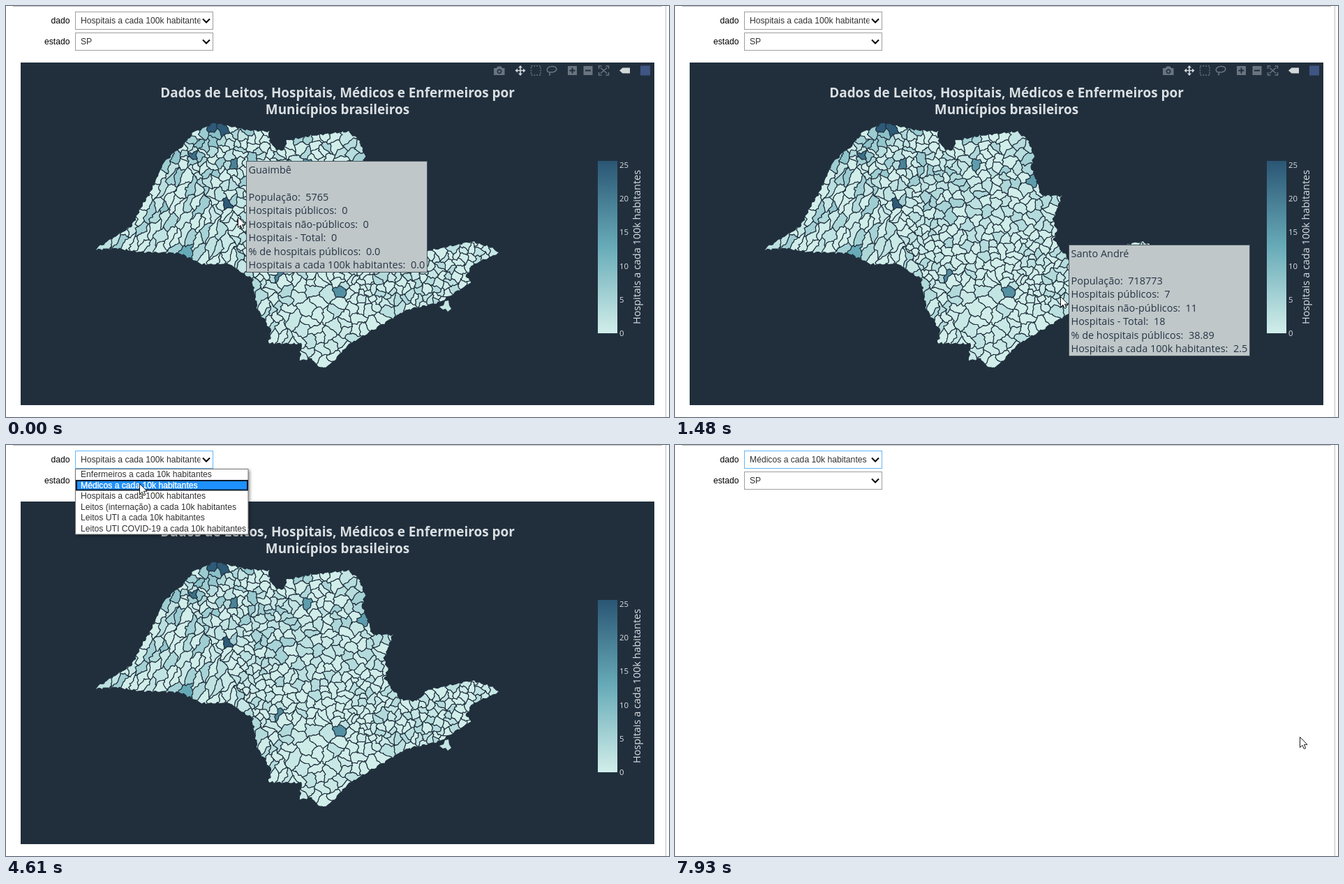
An HTML page that plays this animation: 950x589 px, repeating every 8000 ms.

```html
<!DOCTYPE html>
<html lang="pt-BR">
<head>
<meta charset="utf-8">
<title>Dados por municípios</title>
<style>
  html, body { margin: 0; width: 100%; height: 100%; overflow: hidden; background: #fff; }
  svg { display: block; }
  text { white-space: pre; }
  .ui { font: 12.17px "Liberation Sans", Arial, sans-serif; fill: #333; }
  .label { fill: #000; text-anchor: end; }
  .plot { font-family: "Open Sans", "Noto Sans", sans-serif; fill: #dadfe2; }
  .title { font-size: 18.9px; font-weight: 700; text-anchor: middle; }
  .tick { font-size: 11.4px; }
  .axis { font-size: 14.45px; text-anchor: middle; }
  #tip text { font: 14.45px "Open Sans", "Noto Sans", sans-serif; fill: #263544; }
  .box { fill: #fff; stroke: #9e9e9e; }
  .chev { fill: none; stroke: #000; stroke-width: 2; }
  #list { filter: drop-shadow(2px 2px 2px rgba(0, 0, 0, .4)); }
  #list .on { fill: #fff; stroke: #fff; stroke-width: .35; }
  #cells path { stroke: #212f3d; stroke-width: 1.15; stroke-linejoin: round; }
  .line { fill: none; stroke: #69747f; stroke-width: 1.5; }
  .active { fill: #d3d8db; }
</style>
</head>
<body>
<svg id="stage" width="950" height="589" viewBox="0 0 950 589">
  <defs>
    <linearGradient id="ramp" x1="0" y1="1" x2="0" y2="0"></linearGradient>
    <clipPath id="land"><path id="coast"/></clipPath>
    <clipPath id="field"><rect x="100" y="9" width="178.500" height="24"/></clipPath>
  </defs>
  <path d="M10 .5H940M945.500 0V589" stroke="#bdbdbd" fill="none"/>

  <g id="plot" class="plot">
    <rect x="21" y="81" width="908" height="491" fill="#212f3d"/>
    <text class="title" x="475" y="131">Dados de Leitos, Hospitais, Médicos e Enfermeiros por</text>
    <text class="title" x="475" y="155">Municípios brasileiros</text>
    <g id="cells" clip-path="url(#land)"></g>
    <path d="M621 431l6-2 2-6 5-1 1 7 3 5-5 4-3-4-4 1z" fill="#c4e7e4"/>
    <rect x="848" y="222" width="28" height="247" fill="url(#ramp)"/>
    <g id="ticks"></g>
    <text class="axis" transform="translate(908.500 345.500) rotate(-90)">Hospitais a cada 100k habitantes</text>

    <g id="bar" fill="#69747f">
      <path fill-rule="evenodd" d="M699 89h4l1.500-2.500h5L711 89h3.500v10H699zM707 90.300a3.500 3.500 0 1 0 .01 0zM707 92a1.800 1.800 0 1 1-.01 0z"/>
      <path class="active" d="M737 85l3 3.500h-2.200v3.200h3.200V89.500l3.500 3-3.500 3v-2.200h-3.200v3.200h2.200l-3 3.500-3-3.500h2.200v-3.200H733v2.200l-3.500-3 3.500-3v2.200h3.200V88.500H734z"/>
      <rect class="line" x="752.500" y="86" width="13.500" height="13" stroke-dasharray="2 1.800"/>
      <path class="line" d="M778 95c-5-2-3-8 4-8.500s9 5 4 7.500-8-1-7 2 1 2-1 3"/>
      <path fill-rule="evenodd" d="M805 86h13v13h-13zM810.500 88.500v3h-3v2h3v3h2v-3h3v-2h-3v-3z"/>
      <path fill-rule="evenodd" d="M827.500 86h13v13h-13zM830 91.500v2h8v-2z"/>
      <path class="line" d="M849.500 90v-4h4M859.500 86h4v4M863.500 95v4h-4M853.500 99h-4v-4M852 88.500l9 8M861 88.500l-9 8"/>
      <path class="active" d="M879 92.500l4.500-4H894v8h-10.500z"/>
      <rect x="909" y="85.500" width="14" height="14" fill="#3f5583"/>
    </g>
  </g>

  <g id="tip"><rect height="159" fill="#bfc7c9" stroke="#49545d"/></g>

  <g class="ui">
    <text class="label" x="91.500" y="25">dado</text>
    <text class="label" x="91.500" y="55">estado</text>
    <rect id="focus" class="box" x="99.500" y="8.500" width="197" height="25"/>
    <rect class="box" x="99.500" y="38.500" width="197" height="25"/>
    <text id="choice" x="107" y="25" clip-path="url(#field)"></text>
    <text x="107" y="55">SP</text>
    <path class="chev" d="M282 18.500l5 5 5-5M282 48.500l5 5 5-5"/>
    <g id="list"><rect x="99.500" y="34.500" width="247.500" height="93.500" fill="#fff" stroke="#767676"/></g>
  </g>

  <path id="cursor" d="M.5.500V15.500L4 12.300 6.300 17.500 8.700 16.500 6.500 11.300H11z" fill="#fff" stroke="#000" stroke-width=".9"/>
</svg>

<script>
const LOOP = 8000;
const $ = id => document.getElementById(id);
const clamp = v => Math.max(0, Math.min(1, v));
const mix = (a, b, u) => a.map((v, i) => v + (b[i] - v) * u);
function add(parent, tag, attrs, text) {
  const el = document.createElementNS('http://www.w3.org/2000/svg', tag);
  for (const k in attrs) el.setAttribute(k, attrs[k]);
  if (text) el.textContent = text;
  return parent.appendChild(el);
}

// Colour scale from 0 to 25.6
const pale = [209, 238, 234], mid = [104, 171, 184], deep = [42, 86, 116];
function shade(v) {
  const u = clamp(v / 25.6) * 2;
  return `rgb(${(u < 1 ? mix(pale, mid, u) : mix(mid, deep, u - 1)).map(Math.round)})`;
}
for (const u of [0, .5, 1]) add($('ramp'), 'stop', { offset: u, 'stop-color': shade(u * 25.6) });
for (let v = 0; v <= 25; v += 5)
  add($('ticks'), 'text', { class: 'tick', x: 879, y: 473 - v * 9.65 }, String(v));

// Map: a Voronoi mesh clipped to the state border
const border = ('127,349 179,316 206,268 228,222 255,199 268,182 299,168 345,178 376,180 377,193 388,207 ' +
  '399,206 403,193 437,186 491,180 506,193 514,216 510,230 525,272 554,272 541,307 547,320 542,335 565,365 ' +
  '588,367 605,351 668,338 697,347 705,354 668,371 658,388 667,396 622,424 572,436 490,486 462,516 452,519 ' +
  '437,505 421,508 424,484 376,483 380,465 361,435 352,390 318,369 280,370 250,354 190,352 160,347')
  .split(' ').map(p => p.split(',').map(Number));
// x, y, value of the municipalities that stand out
const marks = [[296, 175, 25], [311, 178, 25], [327, 226, 19], [270, 212, 22], [316, 285, 25],
  [389, 386, 18], [481, 409, 17], [260, 352, 13], [432, 228, 15], [511, 250, 15]];

let seed = 77;
function rand() {
  seed = (seed * 16807) % 2147483647;
  return seed / 2147483647;
}
function inside([x, y]) {
  let hit = false;
  border.forEach(([ax, ay], i) => {
    const [bx, by] = border[(i + 1) % border.length];
    if (ay > y !== by > y && x < ax + (bx - ax) * (y - ay) / (by - ay)) hit = !hit;
  });
  return hit;
}
// Negative in the west, where municipalities are long slanted strips
const seam = ([x, y]) => x - 245 - .62 * (y - 205);
function dist2(a, b, west) {
  const dx = a[0] - b[0], dy = a[1] - b[1];
  if (!west) return dx * dx + dy * dy;
  const along = .45 * dx - .89 * dy, across = .89 * dx + .45 * dy;
  return .2 * along * along + across * across;
}
function spacing([x, y], west) {
  const uneven = 1 + .35 * Math.sin(.21 * x + .05 * y) * Math.sin(.19 * y - .07 * x);
  if (west) return 8.5 * uneven;
  if (y > 425 || (y > 395 && x < 470)) return 13.5 * uneven;
  return (x > 480 && y > 330 ? 7.5 : x < 385 ? 8 : 10) * uneven;
}
// Higher values to the north-west
function value([x, y]) {
  const top = 4 + 6 * clamp((560 - x / 2 - y) / 250);
  return rand() < .35 ? 0 : top * rand() ** 1.4;
}
function scatter() {
  const sites = marks.map(([x, y, v]) => ({ p: [x, y], v, west: seam([x, y]) < 0 }));
  for (let i = 0; i < 7000; i++) {
    const p = [128 + 580 * rand(), 166 + 355 * rand()];
    if (!inside(p)) continue;
    const west = seam(p) < 0, r = spacing(p, west) ** 2;
    if (sites.every(s => s.west !== west || dist2(s.p, p, west) > r)) sites.push({ p, v: value(p), west });
  }
  return sites;
}
// Keep the part of a polygon where f is below zero
function cut(poly, f) {
  const out = [];
  poly.forEach((a, i) => {
    const b = poly[(i + 1) % poly.length], fa = f(a), fb = f(b);
    if (fa <= 0) out.push(a);
    if (fa <= 0 !== fb <= 0) out.push(mix(a, b, fa / (fa - fb)));
  });
  return out;
}
// Bend points along smooth waves, so that straight edges look like rivers
function bend([x, y], sway) {
  const dx = sway * Math.sin(.27 * y + .11 * x) + Math.sin(.6 * y - .2 * x) + .7 * Math.sin(1.1 * y + .7 * x);
  const dy = sway * Math.sin(.25 * x - .13 * y) + Math.sin(.6 * x + .2 * y) + .7 * Math.sin(1.2 * x - .6 * y);
  return `${(x + dx).toFixed(1)} ${(y + dy).toFixed(1)}`;
}
function rough(poly, sway) {
  const pts = [];
  poly.forEach((a, i) => {
    const b = poly[(i + 1) % poly.length];
    const n = Math.ceil(Math.hypot(b[0] - a[0], b[1] - a[1]) / 3);
    for (let k = 0; k < n; k++) pts.push(bend(mix(a, b, k / n), sway));
  });
  return `M${pts.join('L')}Z`;
}
function drawMap() {
  const edge = rough(border, 0), sites = scatter();
  $('coast').setAttribute('d', edge);
  add($('cells'), 'path', { d: edge, fill: shade(1) });
  for (const s of sites) {
    let poly = [[-40, -40], [40, -40], [40, 40], [-40, 40]].map(([x, y]) => [s.p[0] + x, s.p[1] + y]);
    poly = cut(poly, p => s.west ? seam(p) : -seam(p));
    for (const o of sites) {
      if (o === s || o.west !== s.west || Math.hypot(o.p[0] - s.p[0], o.p[1] - s.p[1]) > 90) continue;
      poly = cut(poly, p => dist2(p, s.p, s.west) - dist2(p, o.p, s.west));
    }
    if (poly.length > 2) add($('cells'), 'path', { d: rough(poly, 1.8), fill: shade(s.v) });
  }
}
drawMap();

// Dropdown
const options = ['Enfermeiros a cada 10k habitantes', 'Médicos a cada 10k habitantes',
  'Hospitais a cada 100k habitantes', 'Leitos (internação) a cada 10k habitantes',
  'Leitos UTI a cada 10k habitantes', 'Leitos UTI COVID-19 a cada 10k habitantes'];
const mark = add($('list'), 'rect', { x: 101, width: 245, height: 13.5, fill: '#1e90ff', stroke: '#0b1a2c', 'stroke-width': 2 });
const items = options.map((o, i) => add($('list'), 'text', { x: 107, y: 46 + 15.5 * i }, o));

// Time, name, population, public and private hospitals, offset from the pointer
const towns = [
  [0, 'Guaimbê', 5765, 0, 0, 12, -80],
  [120, 'Getulina', 11403, 0, 1, 12, -82],
  [400, 'Cafelândia', 17804, 0, 1, 8, -77],
  [680, 'Laranjal Paulista', 28516, 0, 1, -12, -85],
  [830, 'Itupeva', 61252, 1, 0, 4, -78],
  [1330, 'Santo André', 718773, 7, 11, 12, -74],
  [1730, 'São Paulo', 12252023, 84, 159, 5, -72],
  [3260]];
const lines = [0, 2, 3, 4, 5, 6, 7].map(i => add($('tip'), 'text', { x: 3, y: 17 + 19.5 * i }));
const tipBox = $('tip').querySelector('rect');
function decimal(n) {
  const r = +n.toFixed(2);
  return Number.isInteger(r) ? r.toFixed(1) : String(r);
}
function showTip([, name, pop, pub, priv, dx, dy], x, y) {
  $('tip').style.display = name ? '' : 'none';
  if (!name) return;
  const all = pub + priv;
  const rows = [name, `População:  ${pop}`, `Hospitais públicos:  ${pub}`, `Hospitais não-públicos:  ${priv}`,
    `Hospitais - Total:  ${all}`, `% de hospitais públicos:  ${decimal(all ? pub / all * 100 : 0)}`,
    `Hospitais a cada 100k habitantes:  ${decimal(all / pop * 1e5)}`];
  rows.forEach((r, i) => lines[i].textContent = r);
  tipBox.setAttribute('width', Math.round(lines[6].getComputedTextLength() + 6));
  $('tip').setAttribute('transform', `translate(${x + dx + .5} ${y + dy + .5})`);
}

// Pointer strokes: first step, last step, number of steps, end point
const start = [332, 302];
const strokes = [
  [120, 120, 1, 324, 296], [400, 680, 3, 484, 381], [830, 1330, 5, 554, 419], [1480, 1880, 4, 547, 408],
  [3260, 3380, 2, 179, 129], [3540, 3540, 1, 143, 46], [3690, 4080, 4, 150, 19], [4340, 4610, 3, 191, 55],
  [5850, 6130, 3, 801, 347], [6250, 6650, 4, 889, 420], [7500, 7930, 2, 895, 418]];
function pointer(t) {
  let pos = start;
  for (const [from, to, n, x, y] of strokes) {
    if (t < from) break;
    const k = t >= to ? n : 1 + Math.floor((t - from) / (to - from) * (n - 1));
    pos = mix(pos, [x, y], k / n);
  }
  return pos.map(Math.round);
}

// Highlighted option, -1 while the list is closed
const picks = [[0, -1], [3960, 2], [4340, 0], [4610, 1], [5200, -1]];
const at = (table, t) => table.filter(r => r[0] <= t).pop();

function draw(t) {
  const [x, y] = pointer(t), pick = at(picks, t)[1];
  $('cursor').setAttribute('transform', `translate(${x} ${y})`);
  showTip(at(towns, t), x, y);
  $('bar').setAttribute('opacity', t < 5000 ? clamp((3690 - t) / 300) : clamp((t - 5800) / 330));
  $('plot').style.display = t < 7650 ? '' : 'none';
  $('focus').style.stroke = t < 3830 ? '#9e9e9e' : '#64b5f6';
  $('choice').textContent = options[t < 5200 ? 2 : 1];
  $('list').style.display = pick < 0 ? 'none' : '';
  mark.setAttribute('y', 51 + 15.5 * (pick - 1));
  items.forEach((el, i) => el.classList.toggle('on', i === pick));
}
function frame() {
  draw(performance.now() % LOOP);
  requestAnimationFrame(frame);
}
frame();
</script>
</body>
</html>
```
